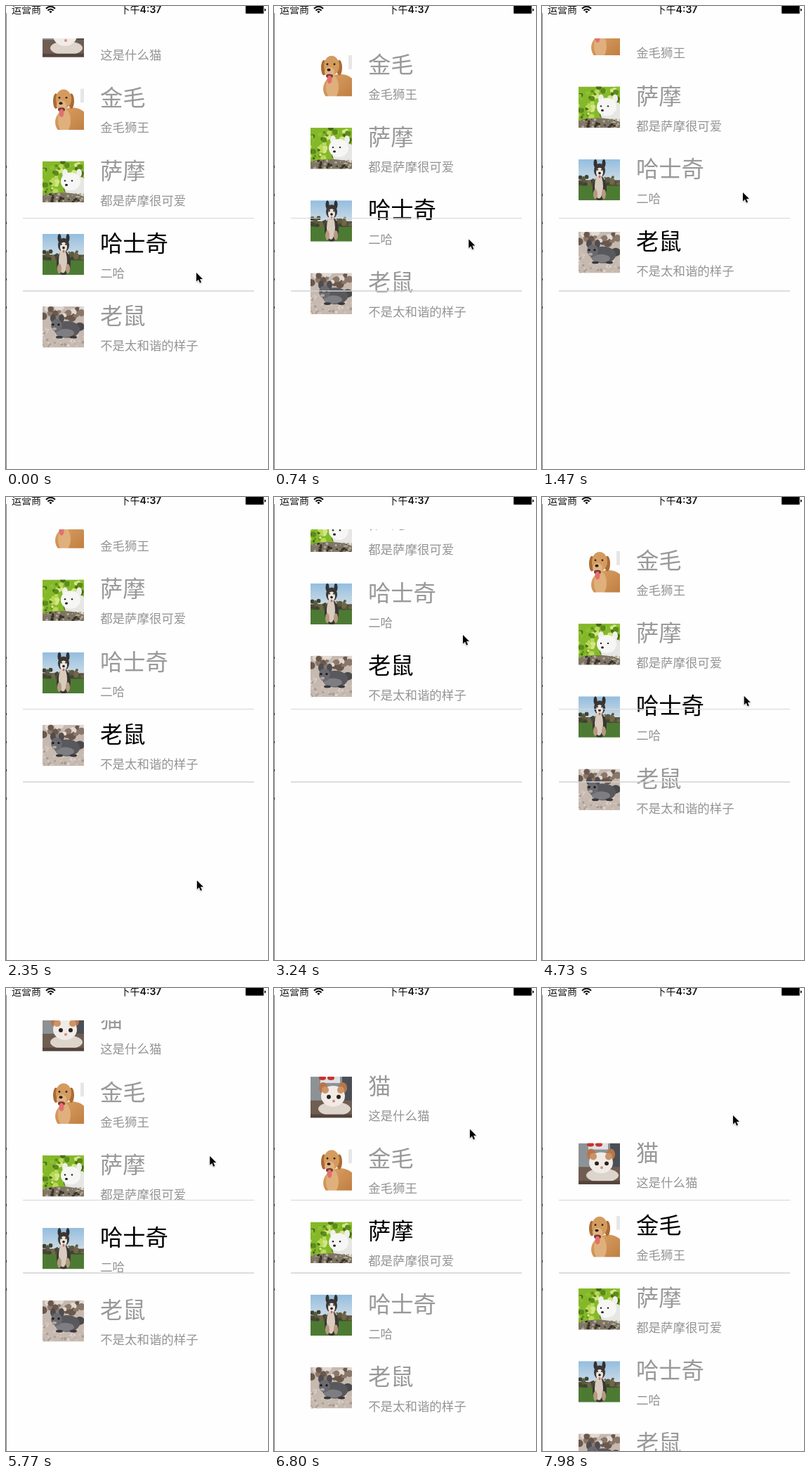
An HTML page for the animation above (8 s loop, 373 px wide and 658 px high).

```html
<!DOCTYPE html>
<html lang="zh-CN">
<head>
<meta charset="utf-8">
<title>Picker</title>
<style>
html, body { margin: 0; width: 100%; height: 100%; overflow: hidden; background: #fefefe; }
#stage { display: block; width: 100vw; height: 100vh; }
text { font-family: "Noto Sans CJK SC", "Noto Sans CJK", "Noto Sans", sans-serif; }
.title { font-size: 32.3px; font-weight: 300; }
.note { font-size: 17.45px; font-weight: 300; fill: #949494; }
.status { font-size: 14px; fill: #111; }
.clock { font-family: Inter, "Noto Sans CJK SC", "Noto Sans CJK", sans-serif; font-weight: 500; }
.clock tspan { font-weight: 600; }
</style>
</head>
<body>
<svg id="stage" viewBox="0 0 373 658" preserveAspectRatio="none">
  <defs>
    <clipPath id="list"><rect y="46" width="373" height="612"/></clipPath>
    <filter id="soft"><feGaussianBlur stdDeviation="0.7"/></filter>
    <linearGradient id="sky" x2="0" y2="1">
      <stop stop-color="#93bddf"/><stop offset="1" stop-color="#d6e0e6"/>
    </linearGradient>
    <linearGradient id="fur" x2="1" y2="1">
      <stop stop-color="#dda468"/><stop offset="1" stop-color="#b9763a"/>
    </linearGradient>
  </defs>
  <rect width="373" height="658" fill="#fefefe"/>
  <g id="rows" clip-path="url(#list)"></g>
  <path d="M24 301.5H353" stroke="#d6d6d6"/>
  <path d="M24 405H353" stroke="#d2d2d2" stroke-width="1.6"/>
  <path d="M.5 10V658" stroke="#8a8a8a"/>
  <path d="M.5 227V430" stroke="#222" stroke-dasharray="3 37"/>
  <text class="status" x="8" y="10">运营商</text>
  <g fill="none" stroke="#111" stroke-width="2">
    <path d="M57 3.7Q63.5-2.3 70 3.7M59.4 6.4Q63.5 2.6 67.6 6.4"/>
    <path d="M61.4 7.9Q63.5 6.1 65.6 7.9L63.5 10.3Z" fill="#111" stroke="none"/>
  </g>
  <text class="status clock" x="192" y="10.3" text-anchor="middle">下午<tspan>4:37</tspan></text>
  <rect x="341" y="-.5" width="26" height="11.5" rx="1" fill="#000" stroke="#bbb" stroke-width=".7"/>
  <path d="M368 3.5q2 .5 2 2t-2 2z" fill="#111"/>
  <path id="cursor" d="M1 1V13.5L4 10.8 6 15.6 8 14.7 6 10H10Z" stroke="#fff" paint-order="stroke" style="filter:drop-shadow(0 1px 1px #0004)"/>
</svg>
<script>
const LOOP = 8000, STEP = 147.8, LAST_STEP = 54;
const PITCH = 103.2, CENTER = 323.8;

// Thumbnails, each on a 59 by 59 field
const oval = (fill, x, y, rx, ry = rx) => `<ellipse fill="${fill}" cx="${x}" cy="${y}" rx="${rx}" ry="${ry}"/>`;
const pair = (fill, x, gap, y, rx, ry) => oval(fill, x - gap, y, rx, ry) + oval(fill, x + gap, y, rx, ry);
const band = (fill, y, h, x = 0, w = 59) => `<rect fill="${fill}" x="${x}" y="${y}" width="${w}" height="${h}"/>`;

let seed = 7;
const random = () => (seed = seed * 16807 % 2147483647) / 2147483647;
const specks = (n, y, h, size, fills) => Array.from({ length: n }, (_, i) =>
  oval(fills[i % fills.length], random() * 59, y + random() * h, size * (.4 + random()))).join("");

const cat = band("#8d9297", 0, 59) + band("#4b4f55", 0, 40, 45, 14) + band("#6f5d52", 34, 25) +
  band("#dfe0e2", 0, 9, 14, 28) + pair("#c8322f", 23, 6, 2, 5, 3) +
  oval("#ddd4cc", 34, 46, 23, 10) + pair("#b5764b", 32, 14, 16, 6, 8) +
  oval("#f1ebe6", 32, 28, 17, 15) + pair("#cb9468", 32, 11, 19, 5, 5) +
  pair("#2c211e", 33, 7, 29, 3, 3) + oval("#cf8e86", 33, 35, 2) + band("#54443c", 54, 5);

const golden = band("#fefefe", 0, 59) + band("#e6e6e7", 0, 20, 54, 5) +
  oval("url(#fur)", 42, 48, 24, 21) + oval("#dfb07c", 31, 46, 9, 17) +
  pair("#ab6a35", 30, 11, 18, 4, 11) + oval("#d49b5f", 30, 15, 11, 14) + oval("#e0b483", 27, 24, 7) +
  pair("#342018", 29, 5, 13, 1.4, 1.4) + oval("#2d201d", 26, 21, 2.6, 2) +
  oval("#7d3730", 27, 30, 5, 3) + oval("#e2706f", 27, 35, 3.5, 6);

const samoyed = band("#84b829", 0, 59) +
  specks(70, 0, 44, 3, ["#b9d957", "#5b8c1b", "#d3e685", "#8fc033", "#4a6b1c"]) +
  oval("#e6e6e3", 48, 37, 17, 16) + pair("#efefec", 42, 10, 17, 4, 6) + oval("#f6f6f4", 40, 29, 14, 13) +
  pair("#222", 37, 5, 28, 1.2, 1.2) + oval("#1e1e1e", 34, 34, 2, 1.6) +
  oval("#7d7464", 27, 59, 40, 14) + specks(60, 47, 12, 1.7, ["#b5ab99", "#3a332a", "#857a68"]);

const husky = band("url(#sky)", 0, 36) + band("#4a4a33", 30, 12) +
  specks(40, 25, 13, 3, ["#5e593f", "#3c4430", "#71664a"]) + band("#4d7a33", 38, 21) +
  pair("#33302e", 30, 6, 6, 2.5, 6) + oval("#3a3634", 30, 42, 10, 17) + oval("#3a3634", 30, 16, 8, 10) +
  oval("#d9cbbd", 29, 39, 6, 17) + oval("#ece5dd", 30, 19, 5, 7) + pair("#b59a80", 30, 6, 50, 3, 7) +
  pair("#1d1c1c", 30, 3, 15, 1, 1) + oval("#1d1c1c", 30, 20, 1.8) + oval("#c56e65", 30, 25, 1.5, 2);

const mouse = band("#c6b9af", 0, 59) + specks(30, 0, 16, 5, ["#e0d9d3", "#8b7769", "#6b584c"]) +
  specks(70, 30, 29, 1.5, ["#ded4cc", "#a89a90", "#d0c5bd"]) +
  oval("#4a494c", 53, 29, 7, 6) + oval("#59595d", 35, 33, 18, 12) + oval("#7d7d82", 32, 38, 13, 6) +
  pair("#4f4d51", 21, 6, 17, 4, 6) + oval("#6b6a6f", 20, 27, 8, 9) +
  pair("#151416", 19, 4, 26, 1.6, 1.6) + oval("#b0a8a5", 17, 32, 3, 2) + pair("#39383b", 34, 10, 44, 5, 2);

const items = [
  ["猫", "这是什么猫", cat],
  ["金毛", "金毛狮王", golden],
  ["萨摩", "都是萨摩很可爱", samoyed],
  ["哈士奇", "二哈", husky],
  ["老鼠", "不是太和谐的样子", mouse],
];
const last = items.length - 1;

const list = document.getElementById("rows");
const cursor = document.getElementById("cursor");
list.innerHTML = items.map(([title, note, art]) => `<g>
  <svg x="52" width="59" height="58.5" viewBox="0 0 59 59" preserveAspectRatio="none" overflow="hidden"><g filter="url(#soft)">${art}</g></svg>
  <text class="title" x="134" y="25">${title}</text>
  <text class="note" x="134.2" y="62">${note}</text></g>`).join("");
const rows = [...list.children];
const titles = rows.map(row => row.querySelector(".title"));

// Pointer drags: pressed at one step, at rest by another, let go HOLD steps later
const HOLD = 1, RUBBER = .26, SNAP = .37, GLIDE_SPEED = 50;
const drags = [
  { press: 1, stop: 10, from: [270, 378], to: [285, 264] },
  { press: 17, stop: 20, from: [266, 642], to: [268, 195] },
  { press: 28, stop: 33, from: [276, 219], to: [288, 289] },
  { press: 38, stop: 41, from: [289, 221], to: [290, 287] },
  { press: 45.6, stop: 47.5, from: [277, 191], to: [285, 267] },
  { press: 54, stop: 55, from: [271, 180], to: [271, 180] },
];

const mix = (a, b, k) => a + (b - a) * k;
const mixPoint = (a, b, k) => a.map((v, i) => mix(v, b[i], k));
const smooth = k => (k = Math.max(0, Math.min(1, k))) * k * (3 - 2 * k);
const nearestRow = y => Math.max(0, Math.min(last, Math.round((y - CENTER) / PITCH)));

// Top of the last row: follows each drag, stretches past the end, then snaps
function scrollAt(step) {
  let y = CENTER + PITCH;
  for (const { press, stop, from, to } of drags) {
    if (step < press) break;
    y += (to[1] - from[1]) * smooth((step - press) / (stop - press));
    if (y < CENTER) y = mix(CENTER, y, RUBBER);
    const rest = CENTER + nearestRow(y) * PITCH;
    const span = SNAP * Math.sqrt(Math.abs(rest - y)) || 1;
    y = mix(y, rest, smooth((step - stop - HOLD) / span));
  }
  return y;
}

function pointerAt(step) {
  let point = drags[0].from, free = 0;
  for (const { press, stop, from, to } of drags) {
    if (step < press) {
      const distance = Math.hypot(from[0] - point[0], from[1] - point[1]);
      const leave = Math.max(free, press - distance / GLIDE_SPEED);
      return mixPoint(point, from, smooth((step - leave) / (press - leave)));
    }
    point = mixPoint(from, to, smooth((step - press) / (stop - press)));
    free = stop + HOLD;
  }
  return point;
}

function draw(time) {
  const step = Math.min(LAST_STEP, Math.floor((time % LOOP + 12) / STEP));
  const bottom = scrollAt(step);
  const selected = last - nearestRow(bottom);
  rows.forEach((row, i) => {
    row.setAttribute("transform", `translate(0 ${bottom - (last - i) * PITCH})`);
    titles[i].setAttribute("fill", i === selected ? "#000" : "#999");
  });
  cursor.setAttribute("transform", `translate(${pointerAt(step)})`);
}

const start = performance.now();
function tick() {
  draw(performance.now() - start);
  requestAnimationFrame(tick);
}
tick();
</script>
</body>
</html>
```
